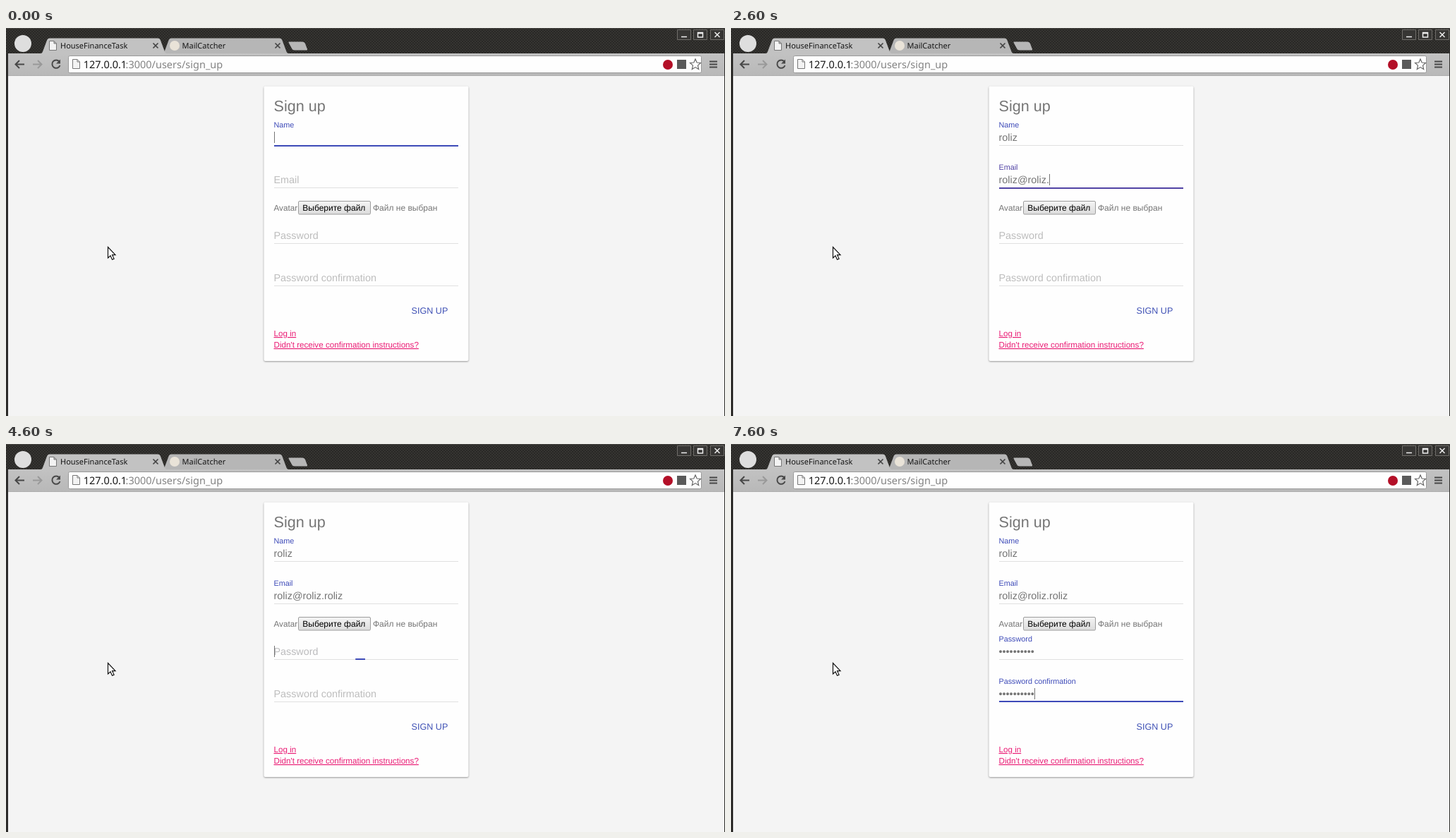
Write an HTML page that moves like this. It is 1019x550 px and loops after 8000 ms.

```html
<!DOCTYPE html>
<html lang="en">
<head>
<meta charset="utf-8">
<title>Sign up</title>
<style>
  html, body { margin: 0; width: 100%; height: 100%; overflow: hidden; background: #f4f4f4; }
  svg { display: block; width: 1019px; height: 550px; }
  text { font-family: "Liberation Sans", Arial, sans-serif; text-rendering: geometricPrecision; white-space: pre; }
  .ui { font-family: "Noto Sans", "Open Sans", sans-serif; }
  .card { fill: #fefefe; filter: drop-shadow(0 1px 1.2px rgba(0,0,0,.38)); }
  .icon { fill: none; stroke: #484848; stroke-width: 2; }
  .link { fill: #ea1c75; font-size: 11.65px; text-decoration: underline; }
  .value { fill: #757575; font-size: 14.4px; }
</style>
</head>
<body>
<svg viewBox="0 0 1019 550">
  <defs>
    <pattern id="weave" width="4" height="4" patternUnits="userSpaceOnUse">
      <rect width="4" height="4" fill="#363532"/>
      <path d="M0 0h2v2H0zM2 2h2v2H2z" fill="#292826"/>
    </pattern>
    <linearGradient id="bar" x2="0" y2="1"><stop stop-color="#c2c2c2"/><stop offset="1" stop-color="#b8b8b8"/></linearGradient>
    <linearGradient id="button" x2="0" y2="1"><stop stop-color="#f5f5f5"/><stop offset="1" stop-color="#dcdcdc"/></linearGradient>
    <path id="tab" d="M47 37Q51 36 52 33.500L58 17.500Q59 14.500 62 14.500H215Q218 14.500 219 17.500L225 33.500Q226 36 231 37z"/>
    <g id="page">
      <path d="M.5 .5h6.500l3.500 3.500v9.500h-10zM7 .5v3.500h3.500" fill="#f3f3f3" stroke="#777"/>
    </g>
    <path id="cross" d="M-3.500-3.500l7 7m0-7l-7 7"/>
  </defs>

  <!-- Window frame -->
  <rect width="1019" height="550" fill="#f4f4f4"/>
  <rect width="1019" height="37" fill="url(#weave)"/>
  <path d="M0 .5h1019" stroke="#484744"/>
  <circle cx="24" cy="22" r="12" fill="#dedede"/>
  <use href="#tab" x="172.500" fill="#b6b6b6"/>
  <path d="M400.500 20.500Q400 19.500 402 19.500H420Q423 19.500 424 22L427 30Q427.500 31.500 426 31.500H409Q406 31.500 405 29z" fill="#b6b6b6"/>
  <rect y="36" width="1019" height="32" fill="url(#bar)"/>
  <use href="#tab" fill="#c2c2c2"/>
  <path d="M0 67.500H1019" stroke="#aeaeae"/>
  <use href="#page" x="61" y="18"/>
  <circle cx="239" cy="25" r="7" fill="#e9e3d8"/>
  <text class="ui" x="77" y="29" font-size="11" fill="#161616">HouseFinanceTask</text>
  <text class="ui" x="249.500" y="29" font-size="11" fill="#161616">MailCatcher</text>
  <g stroke="#444" stroke-width="1.700">
    <use href="#cross" x="212" y="25"/><use href="#cross" x="385" y="25"/>
  </g>
  <path d="M951.500 2.500h19v14h-19zM974.500 2.500h19v14h-19zM998.500 2.500h19v14h-19z" fill="#373634" stroke="#706e6a"/>
  <g fill="none" stroke="#ededed" stroke-width="1.500">
    <path d="M957 12.500h8M980.500 6.500h7v6.500h-7zM980 7.500h8"/><use href="#cross" x="1008" y="9.500"/>
  </g>

  <!-- Toolbar -->
  <path class="icon" d="M26 51.500H14M19 46l-5.500 5.500L19 57"/>
  <path class="icon" d="M38 51.500H50M45 46l5.500 5.500L45 57" style="stroke:#999"/>
  <path class="icon" d="M75.500 47.500A5.700 5.700 0 1 0 76.500 53"/>
  <path d="M77 44.500v6h-6z" fill="#484848"/>
  <rect x="88.500" y="39.500" width="897" height="24" rx="2" fill="#fefefe" stroke="#999"/>
  <use href="#page" x="94" y="44"/>
  <text class="ui" x="109.700" y="57" font-size="14.500" fill="#151515">127.0.0.1</text>
  <text class="ui" x="169.500" y="57" font-size="14.500" fill="#838383">:3000/users/sign_up</text>
  <circle cx="938" cy="52" r="7" fill="#b30f27"/>
  <rect x="951" y="45" width="13" height="13" fill="#5a5a5a"/>
  <path d="M977 44l2.200 5 5.300.5-4 3.600 1.200 5.300-4.700-2.800-4.700 2.800 1.200-5.300-4-3.600 5.300-.5z" fill="#fff" stroke="#666" stroke-width="1.200"/>
  <path class="icon" d="M997 47.500h11M997 51.500h11M997 55.500h11"/>
  <path d="M1.500 36V550" stroke="#2d2c2a" stroke-width="3"/>
  <path d="M1018.500 36V550" stroke="#2d2c2a"/>

  <!-- Form -->
  <rect class="card" x="365.500" y="82.500" width="290" height="389.500" rx="2"/>
  <text x="379.500" y="118" font-size="21.600" fill="#757575">Sign up</text>
  <text x="379.500" y="259" font-size="11.700" fill="#757575">Avatar</text>
  <rect x="414.500" y="245.500" width="102" height="18.500" rx="1.500" fill="url(#button)" stroke="#9c9c9c"/>
  <text x="420.300" y="259" font-size="12" fill="#000">Выберите файл</text>
  <text x="520" y="259" font-size="12" fill="#757575">Файл не выбран</text>
  <g id="fields"></g>
  <text x="574.500" y="405" font-size="12.600" fill="#3f51b5">SIGN UP</text>
  <text class="link" x="379.500" y="437">Log in</text>
  <text class="link" x="379.500" y="453">Didn't receive confirmation instructions?</text>
  <path d="M144.500 310.500v15.500l3.500-3.200 2.500 5.500 2.600-1.200-2.500-5.400h4.400z" fill="#fff" stroke="#111" stroke-width="1.200"/>
</svg>
<script>
const LOOP = 8000, STEP = 100, LEFT = 380, WIDTH = 261, MOVE = 300;
const GRAY = [189, 189, 189], BLUE = [61, 74, 184], RED = [209, 10, 31];
const USER = "roliz", MAIL = USER + "@" + USER;

// [time, length] pairs become [time, typed text]
const typing = (text, steps) => steps.map(([time, n]) => [time, text.slice(0, n)]);
const dots = steps => typing("•".repeat(10), steps);

const fields = [
  { label: "Name", base: 160, line: 166, focus: -1000, blur: 1074,
    typed: typing(USER, [[500, 2], [600, 3], [800, 4], [900, 5]]) },
  { label: "Email", base: 220, line: 226, focus: 1074, blur: 4274,
    typed: [
      ...typing(MAIL + ".ru", [[1400, 1], [1500, 2], [1600, 4], [1700, 5], [1900, 6], [2100, 7], [2200, 9],
        [2300, 10], [2500, 11], [2600, 12], [3100, 13], [3200, 14], [3500, 13]]),
      ...typing(MAIL + "." + USER, [[3700, 14], [3800, 15], [4000, 16], [4100, 17]])
    ],
    validity: [1374, 2074, 2574, 3074] },
  { label: "Password", base: 299, line: 304, focus: 4574, blur: 6274,
    typed: dots([[5300, 3], [5500, 4], [5600, 5], [5700, 6], [5800, 7], [5900, 8], [6100, 9], [6200, 10]]) },
  { label: "Password confirmation", base: 359, line: 364, focus: 6274, blur: Infinity,
    typed: dots([[6600, 1], [6700, 2], [6800, 3], [6900, 4], [7000, 5], [7200, 7], [7300, 8], [7500, 9], [7600, 10]]) }
];

const clamp = x => Math.max(0, Math.min(1, x));
const lerp = (a, b, p) => a + (b - a) * p;
const mix = (a, b, p) => a.map((v, i) => lerp(v, b[i], p));
const css = color => `rgb(${color.map(Math.round)})`;

// cubic-bezier(.4, 0, .2, 1)
function ease(x) {
  x = clamp(x);
  if (x === 0 || x === 1) return x;
  let low = 0, high = 1, s;
  for (let i = 0; i < 20; i++) {
    s = (low + high) / 2;
    const bx = 1.2 * s * (1 - s) ** 2 + 0.6 * s * s * (1 - s) + s ** 3;
    if (bx < x) low = s; else high = s;
  }
  return 3 * s * s * (1 - s) + s ** 3;
}

function add(tag, attrs) {
  const node = document.createElementNS("http://www.w3.org/2000/svg", tag);
  set(node, attrs);
  return document.getElementById("fields").appendChild(node);
}
function set(node, attrs) {
  for (const key in attrs) node.setAttribute(key, attrs[key]);
}

for (const f of fields) {
  const ruleY = f.line + (f.base > 250 ? 1 : 0);
  add("rect", { x: LEFT, y: ruleY, width: WIDTH, height: 1, fill: "#e0e0e0" });
  f.bar = add("rect", { y: f.line, height: 2 });
  f.labelNode = add("text", { x: LEFT - 0.5 });
  f.labelNode.textContent = f.label;
  f.value = add("text", { x: LEFT - 0.5, y: f.base, class: "value" });
  f.caret = add("rect", { y: f.base - 13, width: 1, height: 16, fill: "#757575" });
}

function drawField(f, t) {
  const floated = ease((t - f.focus) / MOVE);
  const grow = t < f.blur ? floated : 1 - ease((t - f.blur) / MOVE);
  const invalid = (f.validity || []).reduce(
    (sum, start, i) => sum + (i % 2 ? -1 : 1) * clamp((t - start) / 200), 0);
  const accent = mix(BLUE, RED, invalid);

  set(f.bar, {
    x: LEFT + lerp(0.45 * WIDTH, 0, grow),
    width: grow > 0 ? lerp(9, WIDTH, grow) : 0,
    fill: css(accent)
  });
  set(f.labelNode, {
    y: lerp(f.base, f.base - 19, floated),
    "font-size": lerp(14.4, 10.8, floated),
    fill: css(mix(GRAY, accent, floated))
  });

  const entry = f.typed.filter(([time]) => time <= t).pop();
  f.value.textContent = entry ? entry[1] : "";
  const end = entry ? f.value.getComputedTextLength() : 0;
  const blinkedOff = t >= 300 && t < 500;
  const active = t >= f.focus && t < f.blur && !blinkedOff;
  set(f.caret, { x: LEFT + Math.floor(end), visibility: active ? "visible" : "hidden" });
}

function frame() {
  const t = Math.floor(performance.now() % LOOP / STEP) * STEP;
  for (const f of fields) drawField(f, t);
  requestAnimationFrame(frame);
}
frame();
</script>
</body>
</html>
```
